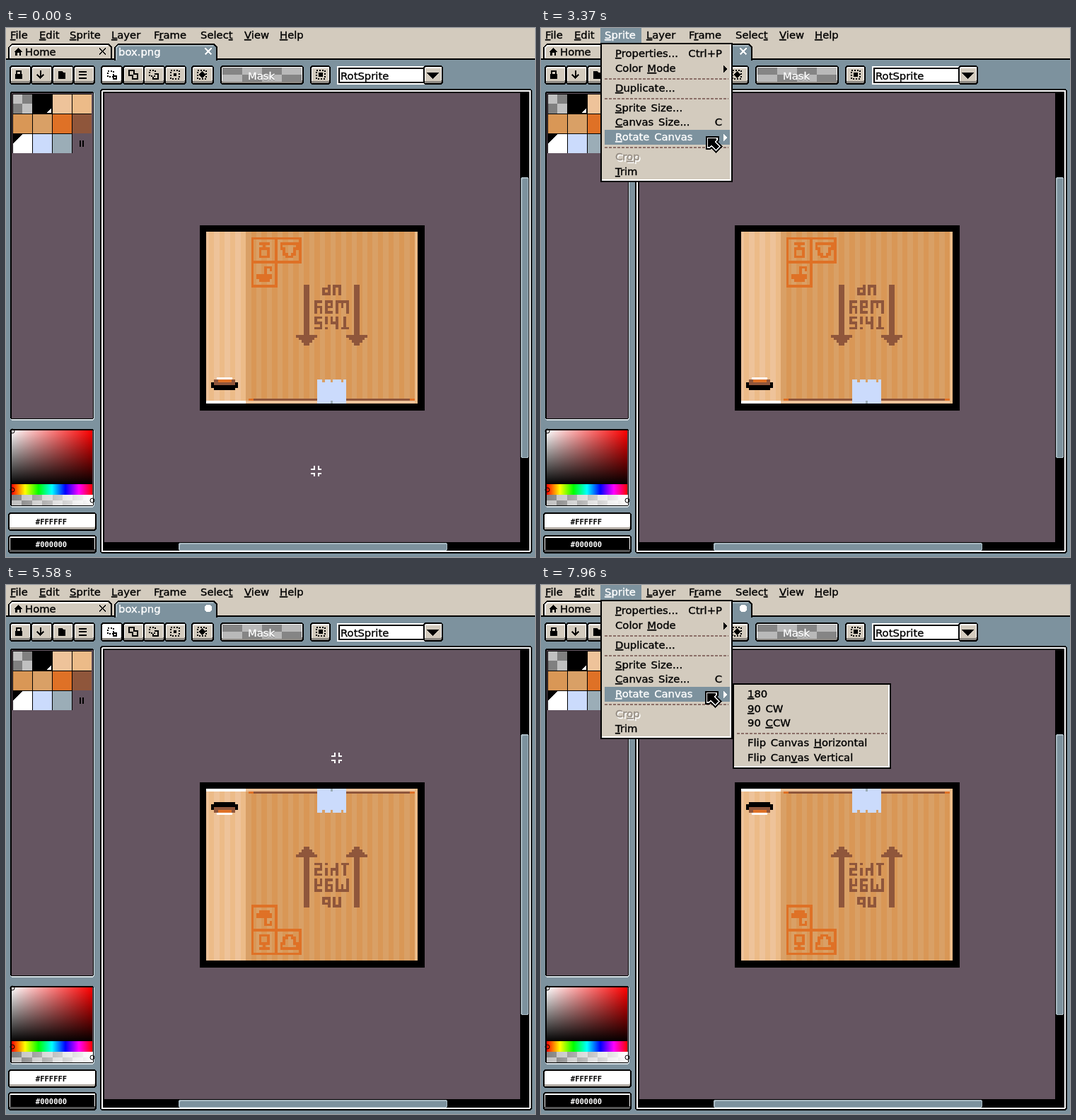
An HTML page for the animation above (8000 ms loop, 748x748 px).

```html
<!DOCTYPE html>
<html lang="en">
<head>
<meta charset="utf-8">
<title>Flip canvas</title>
<style>
  html, body { margin: 0; width: 100%; height: 100%; overflow: hidden; background: #7d929e; }
  svg { display: block; width: 100vw; height: 100vh; shape-rendering: crispEdges; }
  text {
    font: 14.8px "DejaVu Sans", Verdana, sans-serif; word-spacing: 2px; white-space: pre;
    fill: currentColor; stroke: currentColor; stroke-width: .35px;
  }
  .u { text-decoration: underline; }
  .hex { font: bold 10.5px "DejaVu Sans Mono", monospace; stroke: none; }
</style>
</head>
<body>
<svg id="stage" viewBox="0 0 748 748"></svg>
<script>
const FACE = '#d3cbbe', SLATE = '#7d929e', PURPLE = '#655561', INK = '#000', WHITE = '#fff';
const PEACH = '#eec39a', PEACH2 = '#ecbb88', TAN = '#d9a066', TAN2 = '#d99756';
const ORANGE = '#df7126', BROWN = '#8f563b', ICE = '#cbdbfc', GREY = '#9badb7';
const LOOP = 8000;

const rect = (x, y, w, h, fill, more = '') =>
  `<rect x="${x}" y="${y}" width="${w}" height="${h}" fill="${fill}" ${more}/>`;
const shape = (d, fill, more = '') => `<path d="${d}" fill="${fill}" ${more}/>`;
const line = (d, color = INK, width = 2, more = '') =>
  shape(d, 'none', `stroke="${color}" stroke-width="${width}" ${more}`);
// An underscore marks the accelerator letter.
const label = (x, y, s, color = INK, more = '') =>
  `<text x="${x}" y="${y}" color="${color}" ${more}>${s.replace(/_(.)/, '<tspan class="u">$1</tspan>')}</text>`;
const group = (body, more = '') => `<g ${more}>${body}</g>`;

function button(x, y, w, h, fill = FACE, low = '#8d8983') {
  return rect(x, y, w, h, INK, 'rx="4"') + rect(x + 2, y + 2, w - 4, h - 4, low, 'rx="2"') +
    rect(x + 2, y + 2, w - 4, h - 7, WHITE, 'rx="2"') + rect(x + 3, y + 4, w - 6, h - 9, fill);
}

function checker(x, y, cols, rows, w, h, a, b) {
  let out = '';
  for (let i = 0; i < cols * rows; i++) {
    const c = i % cols, r = Math.floor(i / cols);
    out += rect(x + c * w, y + r * h, w, h, (c + r) % 2 ? a : b);
  }
  return out;
}

function menuBar() {
  const items = [[6, '_File'], [47, '_Edit'], [149, '_Layer'], [209, 'F_rame'],
    [275, 'Selec_t'], [337, '_View'], [387, '_Help']];
  return rect(0, 0, 748, 44, FACE) + rect(84, 0, 58, 21, SLATE, 'id="spriteBg"') +
    items.map(([x, s]) => label(x, 15, s)).join('') + label(90, 15, '_Sprite', INK, 'id="spriteText"');
}

function tabs() {
  const cross = (x, c) => line(`M${x} 28.5l9 9m0 -9l-9 9`, c, 1.8);
  return rect(0, 43, 748, 2, INK) +
    shape('M3 44V27L8 22H145L150 27V44Z', INK) + shape('M5 43V28L9 24H144L148 28V43Z', FACE) +
    line('M6 42V28L9 25H144', WHITE, 1.8) +
    shape('M153 46V27L158 22H294L299 27V46Z', INK) + shape('M155 46V28L159 24H293L297 28V46Z', SLATE) +
    line('M156 45V28L159 25H293', '#a9bac3', 1.8) +
    shape('M11 34L17 28L23 34H21V39H18.5V35H15.5V39H13V34Z', INK) +
    label(27, 39, 'Home') + cross(132, INK) + label(159, 39, 'box.png', WHITE) +
    group(cross(281.5, WHITE), 'id="clean"') + '<circle id="dirty" cx="286" cy="33" r="5.5" fill="#fff"/>';
}

function toolbar() {
  const dash = 'stroke-dasharray="2 2"';
  const box = (x, y, size, more) => line(`M${x} ${y}h${size}v${size}h-${size}z`, INK, 2, more);
  let out = [5, 35, 65, 95].map(x => button(x, 53, 31, 27)).join('') +
    [134, 165, 194, 224].map((x, i) => button(x, 53, 31, 27, i ? FACE : WHITE)).join('') +
    button(262, 53, 32, 27) + button(430, 53, 29, 27);
  out += rect(13, 65, 10, 7, INK) + line('M15 65V61H21V65') +
    line('M48.5 60V70M44 66L48.5 70.5L53 66') + shape('M74 61H79L81 63H84V72H74Z', INK) +
    line('M103 61.5H114M103 66H114M103 70.5H114');
  out += box(144, 61, 8, dash) + box(152, 68, 4) +
    line('M174 60h7v5h5v7h-7v-5h-5z') +
    box(203, 60, 8, dash) + line('M212 65h3v7h-7v-3') +
    box(233, 60, 12, dash) + rect(237, 64, 4, 4, INK) +
    box(271, 60, 12, dash) + shape('M277 61l5 5l-5 5l-5 -5z', INK) +
    box(439, 60, 12, dash) + rect(442, 63, 6, 6, INK);
  out += button(303, 53, 118, 27) + checker(306, 56, 4, 2, 28, 10, '#b9b9b9', '#858585') +
    label(361, 74, 'Mask', '#777', 'text-anchor="middle"') +
    label(361, 73, 'Mask', WHITE, 'text-anchor="middle"');
  out += rect(468, 54, 124, 26, WHITE) + rect(470, 56, 121, 22, INK) + rect(472, 58, 118, 18, WHITE) +
    label(473, 73, 'RotSprite') + button(590, 53, 28, 27) + shape('M595 63H612L603.5 72Z', INK);
  return out;
}

function panel(x, y, w, h) {
  return rect(x - 2, y - 2, w + 4, h + 5, '#d5dfe4', 'rx="4"') + rect(x - 2, y - 2, w + 3, h + 3, INK, 'rx="3"') +
    rect(x, y, w, h, PURPLE);
}

function palette() {
  const colors = ['', INK, PEACH, PEACH2, TAN2, TAN, ORANGE, BROWN, WHITE, ICE, GREY];
  let out = panel(8, 92, 115, 460) + rect(9, 93, 112, 56, INK) + rect(9, 149, 85, 28, INK);
  colors.forEach((c, i) => {
    const x = 10 + i % 4 * 28, y = 94 + (i >> 2) * 28;
    out += c ? rect(x, y, 26.5, 26.5, c) : checker(x, y, 2, 2, 13.25, 13.25, '#808080', '#c0c0c0');
  });
  return out + shape('M64 113V120H57Z', WHITE) + shape('M10 150H23L10 163Z', INK) +
    line('M104.5 159V168M109 159V168');
}

function picker() {
  const stops = list => list.map((c, i) => `<stop offset="${i / (list.length - 1)}" stop-color="${c}"/>`).join('');
  const ramp = (id, list, more = '') => `<linearGradient id="${id}" ${more}>${stops(list)}</linearGradient>`;
  const ring = (x, y) => `<circle cx="${x}" cy="${y}" r="3" fill="none" stroke="#000" stroke-width="1"/>`;
  return '<defs>' + ramp('sat', [WHITE, '#f00']) + ramp('val', ['#0000', INK], 'x2="0" y2="1"') +
    ramp('hue', ['#f00', '#ff0', '#0f0', '#0ff', '#00f', '#f0f', '#f00']) +
    ramp('alpha', ['#fff0', WHITE]) + '</defs>' + panel(8, 569, 115, 106) +
    rect(8, 569, 114, 77, 'url(#sat)') + rect(8, 569, 114, 77, 'url(#val)') +
    rect(8, 645, 114, 15, 'url(#hue)') + checker(8, 660, 8, 2, 14.4, 7.5, '#c0c0c0', '#808080') +
    rect(8, 660, 115, 15, 'url(#alpha)') +
    group(ring(9, 570) + ring(9, 653) + ring(122, 668), 'shape-rendering="auto"') +
    button(3, 685, 125, 26, WHITE, '#b0aaa2') + label(64, 702, '#FFFFFF', INK, 'class="hex" text-anchor="middle"') +
    button(3, 717, 125, 26, INK, '#555') + label(64, 734, '#000000', WHITE, 'class="hex" text-anchor="middle"') +
    rect(50, 745, 55, 8, PEACH, 'id="chip" stroke="#000" stroke-width="2"');
}

// The box, upright, on an 80 by 65 pixel grid.
function sprite() {
  let out = rect(0, 0, 15, 65, PEACH) + rect(15, 0, 65, 65, TAN);
  for (let i = 1; i < 79; i += 4) out += rect(i, 0, 2, 65, i < 15 ? PEACH2 : TAN2);
  out += rect(0, 0, 15, 1, WHITE) + rect(15, 0, 65, 1, PEACH) + rect(79, 0, 1, 65, PEACH2) +
    rect(16, 1, 63, 1, ORANGE) + rect(18, 1, 59, 1, BROWN) +
    shape('M42 0H53V9H52V8H51V9H48V8H47V9H45V8H44V9H42Z', ICE) + rect(47, 0, 1, 1, GREY);
  out += shape('M3 5H11V6H12V8H11V9H3V8H2V6H3Z', INK) + rect(3, 7, 8, 2, BROWN) +
    rect(4.5, 8, 5, 1, ORANGE) + rect(4, 9, 6, 1, WHITE);
  const arrow = 'h2v1h1v1h1v1h1v1h-3v19h-2v-19h-3v-1h1v-1h1v-1h1z';
  out += shape('M37 22' + arrow + 'M56 22' + arrow, BROWN);
  const word = (x, y, d) => group(line(d, BROWN, 1, 'stroke-linecap="square"'), `transform="translate(${x} ${y}) scale(-1 1)"`);
  out += word(54, 28, 'M.5 .5H2.5M1.5 .5V4.5M4.5 .5V4.5M4.5 2.5H6.5V4.5M8.5 .5h.01M8.5 2.5V4.5M12.5 .5H10.5V2.5H12.5V4.5H10.5') +
    word(54, 34, 'M.5 .5V4.5H4.5V.5M2.5 2.5V4.5M6.5 .5H8.5V4.5H6.5V2.5H8.5M10.5 .5V2.5H12.5M12.5 .5V4.5H10.5') +
    word(51, 41, 'M.5 .5V3.5H2.5V.5M4.5 3.5V.5H6.5V2.5H4.5');
  out += line('M17.5 44.5H26.5V62.5H17.5ZM17.5 53.5H35.5V62.5H17.5Z', ORANGE, 1) +
    shape('M20 46H24V47H25V49H23V51H24V50H25V52H22V49H19V47H20Z', ORANGE) +
    line('M20.5 55.5H23.5V58.5H20.5ZM22 58V60.5M20 60.5H24', ORANGE, 1) +
    line('M28.5 60.5V58.5H29.5V56.5H30.5V55.5H32.5V56.5H33.5V58.5H34.5V60.5Z', ORANGE, 1);
  return group(out, 'id="box"');
}

function editor() {
  return rect(133, 86, 611, 657, INK, 'rx="4"') + rect(135, 88, 607, 653, WHITE, 'rx="2"') +
    rect(137, 90, 603, 649, INK) + rect(139, 92, 588, 635, PURPLE) +
    rect(728, 211, 11, 397, '#a9bac3', 'rx="3"') + rect(730, 213, 8, 394, SLATE, 'rx="2"') +
    rect(244, 728, 380, 11, '#a9bac3', 'rx="3"') + rect(246, 730, 377, 8, SLATE, 'rx="2"') +
    rect(274, 279, 318, 262, INK) + sprite();
}

const MAIN = { id: 'main', x: 84, y: 21, w: 187, h: 197, tx: 105, rules: [72, 100, 169], rows: [
  [41, '_Properties...', 'Ctrl+P'], [62, 'Color _Mode', '>'], [90, '_Duplicate...'], [118, '_Sprite Size...'],
  [138, '_Canvas Size...', 'C'], [159, '_Rotate Canvas', '>'], [187, 'Cr_op'], [208, '_Trim']] };
const SUB = { id: 'sub', x: 271, y: 139, w: 224, h: 121, tx: 292, rules: [210], rows: [
  [159, '_180'], [180, '_90 CW'], [200, '90 _CCW'], [228, 'Flip Canvas _Horizontal'], [249, 'Flip Can_vas Vertical']] };
const ROTATE = 159, CROP = 187;

function popup({ id, x, y, w, h, tx, rules, rows }) {
  const body = rows.map(([by, s, key]) => {
    const off = by === CROP && id === 'main';
    let out = off ? label(tx + 1.5, by + 1.5, s, WHITE) : '';
    out += label(tx, by, s, off ? '#958d84' : 'inherit');
    if (key === '>') out += shape(`M258 ${by - 9}l5 5l-5 5z`, 'currentColor');
    else if (key) out += label(256, by, key, 'inherit', 'text-anchor="end"');
    return group(out, `data-y="${by}" color="#000"`);
  }).join('');
  return group(rect(x, y, w, h, INK) + rect(x + 2, y + 2, w - 4, h - 4, WHITE) + rect(x + 2, y + 2, w - 6, h - 6, FACE) +
    rect(x + 5.5, 0, w - 9.5, 20.5, SLATE, 'class="hot"') +
    rules.map(r => line(`M${x + 6} ${r}H${x + w - 6}`, '#8b6f68', 1.5, 'stroke-dasharray="4 2"')).join('') + body, `id="${id}"`);
}

function cursors() {
  const arrow = 'M2.5 2.5H16V5.500L13.500 8L20 14.500L14.500 20L8 13.500L5.500 16H2.500Z';
  return group(line(arrow, INK, 5.5) + shape(arrow, INK, 'stroke="#fff" stroke-width="1.8"'), 'id="arrow"') +
    group(line('M-7.5 -3H-3V-7.5M3 -7.5V-3H7.5M7.5 3H3V7.5M-3 7.5V3H-7.5', WHITE), 'id="cross"');
}

document.getElementById('stage').innerHTML = rect(0, 0, 748, 748, SLATE) + menuBar() + tabs() + toolbar() +
  palette() + picker() + editor() + popup(MAIN) + popup(SUB) + cursors();

const $ = id => document.getElementById(id);
const show = (id, on) => $(id).setAttribute('display', on ? 'inline' : 'none');
const move = (id, x, y, more = '') => $(id).setAttribute('transform', `translate(${x} ${y}) ${more}`);

// Pointer stops: time, x, y.
const PATH = [[0, 438, 626], [830, 438, 626], [1150, 345, 590], [1420, 190, 320], [1640, 112, 109], [1670, 109, 94],
  [1900, 112, 38], [2200, 118, 11], [2630, 118, 11], [2850, 165, 75], [3100, 212, 130], [3410, 233, 153],
  [3840, 233, 153], [4050, 377, 194], [4440, 472, 244], [5550, 472, 244], [5580, 468, 244], [5950, 265, 170],
  [6360, 114, 40], [6500, 114, 8], [7130, 114, 8], [7460, 156, 95], [7870, 232, 150], [LOOP, 232, 150]];

function slope(i, k) {
  const a = PATH[i - 1], p = PATH[i], b = PATH[i + 1];
  const still = q => q[1] === p[1] && q[2] === p[2];
  if (!a || !b || still(a) || still(b)) return 0;
  return (b[k] - a[k]) / (b[0] - a[0]);
}

function pointer(t) {
  let i = 0;
  while (i < PATH.length - 2 && PATH[i + 1][0] <= t) i++;
  const a = PATH[i], b = PATH[i + 1], d = b[0] - a[0], s = (t - a[0]) / d, q = 1 - s;
  return [1, 2].map(k => a[k] * q * q * (1 + 2 * s) + b[k] * s * s * (3 - 2 * s) +
    d * (slope(i, k) * s * q * q - slope(i + 1, k) * s * s * q));
}

function paint(menu, open, x, y, pinned) {
  show(menu.id, open);
  if (!open) return;
  const inside = x >= menu.x && x < menu.x + menu.w;
  const row = pinned || (inside && menu.rows.map(r => r[0]).find(r => y >= r - 14.5 && y < r + 6));
  const root = $(menu.id), hot = root.querySelector('.hot');
  const lit = row && !(menu === MAIN && row === CROP);
  hot.setAttribute('display', lit ? 'inline' : 'none');
  if (lit) hot.setAttribute('y', row - 15);
  root.querySelectorAll('[data-y]').forEach(g => g.setAttribute('color', lit && +g.dataset.y === row ? WHITE : INK));
}

function draw(t) {
  const [x, y] = pointer(t);
  const open = t >= 2240 && t < 5000 || t >= 6790;
  const sub = t >= 3550 && t < 5000 || t >= 7960;
  const flipped = t >= 5030;
  paint(MAIN, open, x, y, sub && ROTATE);
  paint(SUB, sub, x, y);
  show('spriteBg', open);
  $('spriteText').setAttribute('color', open ? WHITE : INK);
  show('clean', !flipped);
  show('dirty', flipped);
  if (flipped) move('box', 283, 288, 'scale(3.7375)');
  else move('box', 283, 531, 'scale(3.7375 -3.7375)');
  const aiming = !open && x > 138 && x < 727 && y > 91 && y < 727;
  show('cross', aiming);
  show('arrow', !aiming);
  move('cross', Math.round(x) + .5, Math.round(y) + .5);
  move('arrow', Math.round(x), Math.round(y));
  show('chip', !open && x > 93 && x < 122 && y > 92 && y < 149);
  $('chip').setAttribute('fill', y < 121 ? PEACH2 : BROWN);
}

const start = performance.now();
function tick() {
  draw((performance.now() - start) % LOOP);
  requestAnimationFrame(tick);
}
tick();
</script>
</body>
</html>
```
